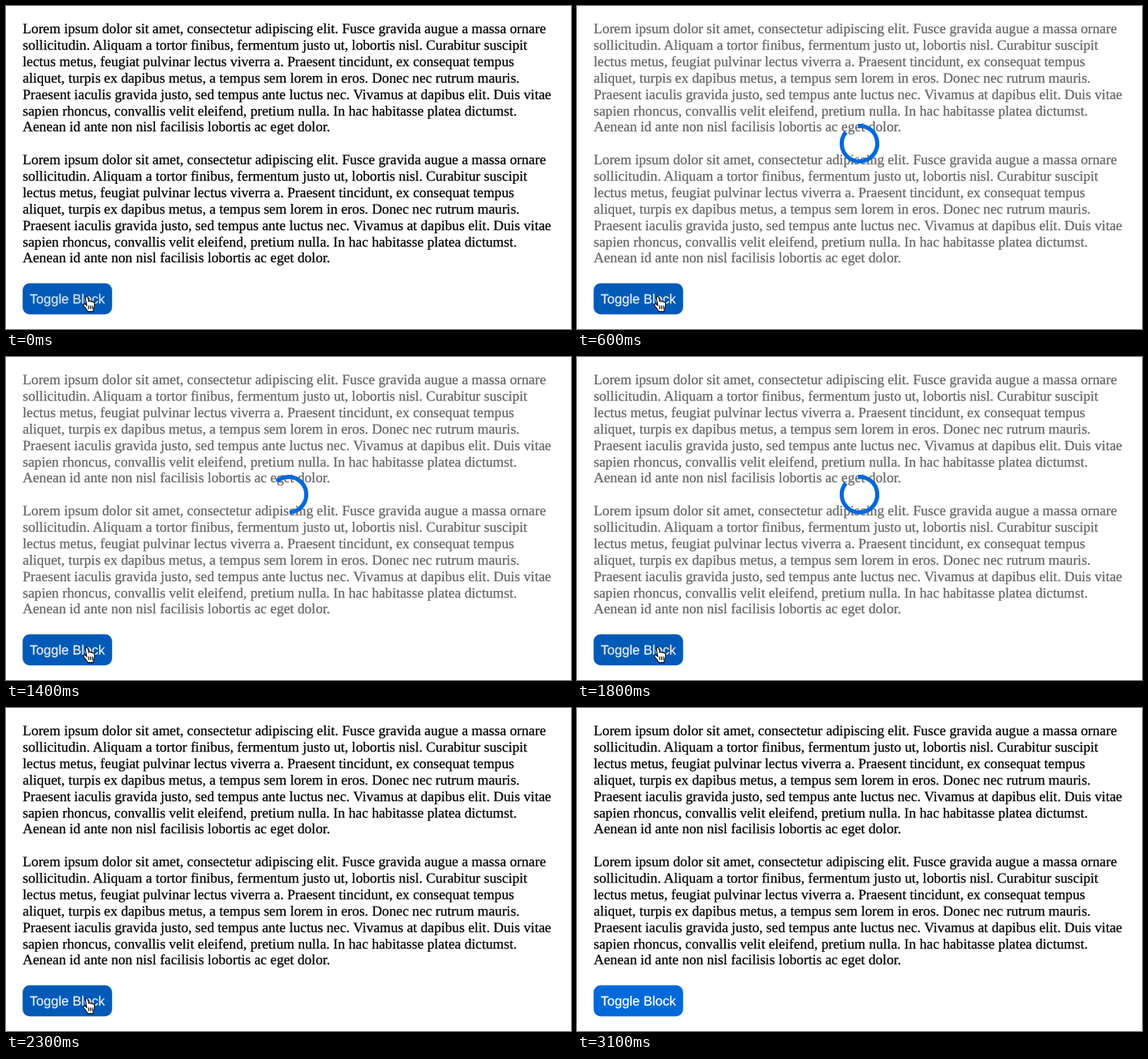
These frames come from a looping animation (686 by 392 pixels, 4.1 s). An HTML page with a canvas:

```html
<!DOCTYPE html>
<html lang="en">
<head>
<meta charset="utf-8">
<title>Toggle Block</title>
<style>
  html, body { margin: 0; width: 100%; height: 100%; overflow: hidden; background: #fff; }
  canvas { display: block; width: 686px; height: 392px; }
</style>
</head>
<body>
<canvas id="stage"></canvas>
<script>
const W = 686, H = 392, LOOP = 4100, STEP = 100;
const canvas = document.getElementById('stage');
const ctx = canvas.getContext('2d');
const ratio = window.devicePixelRatio || 1;
canvas.width = W * ratio;
canvas.height = H * ratio;
ctx.scale(ratio, ratio);
ctx.fontKerning = 'normal';
ctx.textRendering = 'geometricPrecision';
ctx.lineJoin = 'round';

const LINES = [
  'Lorem ipsum dolor sit amet, consectetur adipiscing elit. Fusce gravida augue a massa ornare',
  'sollicitudin. Aliquam a tortor finibus, fermentum justo ut, lobortis nisl. Curabitur suscipit',
  'lectus metus, feugiat pulvinar lectus viverra a. Praesent tincidunt, ex consequat tempus',
  'aliquet, turpis ex dapibus metus, a tempus sem lorem in eros. Donec nec rutrum mauris.',
  'Praesent iaculis gravida justo, sed tempus ante luctus nec. Vivamus at dapibus elit. Duis vitae',
  'sapien rhoncus, convallis velit eleifend, pretium nulla. In hac habitasse platea dictumst.',
  'Aenean id ante non nisl facilisis lobortis ac eget dolor.'
];
const PITCH = 19.87;

// A hairline outline gives the slightly heavy look of smoothed type.
function write(text, x, y, color) {
  ctx.fillStyle = ctx.strokeStyle = color;
  ctx.lineWidth = .25;
  ctx.fillText(text, x, y);
  ctx.strokeText(text, x, y);
}

function drawText(blocked) {
  ctx.font = '17.2px "Liberation Serif", Times, serif';
  const ink = blocked ? '#666' : '#000';
  for (const offset of [0, 8]) {
    LINES.forEach((line, i) => write(line, 20.3, 33.2 + (i + offset) * PITCH, ink));
  }
}

function drawButton(fill, ink) {
  ctx.fillStyle = fill;
  ctx.beginPath();
  ctx.roundRect(20.2, 336.5, 108.6, 37.8, 8.5);
  ctx.fill();
  ctx.font = '16.1px "Liberation Sans", Arial, sans-serif';
  write('Toggle Block', 28.8, 361.2, ink);
}

// Periodic monotone curve through three equally spaced angles, one turn per cycle.
function sweep(keys, phase) {
  const at = i => keys[((i % 3) + 3) % 3] + 360 * Math.floor(i / 3);
  const slope = i => {
    const a = at(i) - at(i - 1), b = at(i + 1) - at(i);
    return 2 * a * b / (a + b);
  };
  const i = Math.floor(phase * 3), u = phase * 3 - i;
  const u2 = u * u, u3 = u2 * u;
  return at(i) * (2 * u3 - 3 * u2 + 1) + slope(i) * (u3 - 2 * u2 + u) +
         at(i + 1) * (3 * u2 - 2 * u3) + slope(i + 1) * (u3 - u2);
}

function drawSpinner(t) {
  const phase = (t + 1000) % 1200 / 1200;
  const rad = Math.PI / 180;
  ctx.strokeStyle = '#0069d9';
  ctx.lineWidth = 5;
  ctx.beginPath();
  ctx.arc(343, 167, 21.6, sweep([-132, -95, 172], phase) * rad, sweep([85, 220, 319], phase) * rad);
  ctx.stroke();
}

function drawHand() {
  ctx.save();
  ctx.translate(93.2, 351.6);
  ctx.scale(1.06, 1.06);
  const hand = new Path2D('M3.2 1.8C3.8.5 5.4.7 5.8 2L7 6.6C7.4 5.6 9 5.6 9.4 6.9' +
    'C10 6 11.4 6.3 11.6 7.4C12.5 6.9 13.6 7.5 13.6 8.8C13.7 11.3 13.2 12.5 12.3 14.4' +
    'L12 18.2H5.6C5.2 15.8 2.8 14.2 1 11.2C.2 9.7 1.8 8.8 3 9.8L4.6 11.4L3.1 3.6Z');
  ctx.fillStyle = '#fff';
  ctx.strokeStyle = '#000';
  ctx.lineWidth = 1;
  ctx.fill(hand);
  ctx.stroke(hand);
  ctx.beginPath();
  for (const x of [6.6, 8.7, 10.8]) {
    ctx.moveTo(x, 11.3);
    ctx.lineTo(x + .1, 15.2);
  }
  ctx.stroke();
  ctx.restore();
}

function render(t) {
  const blocked = t >= 100 && t < 2300;
  ctx.fillStyle = '#fff';
  ctx.fillRect(0, 0, W, H);
  drawText(blocked);
  if (t >= 2700) drawButton('#0069d9', '#fff');
  else if (t >= 2600) drawButton('#0062c8', '#f4f8fc');
  else drawButton('#005ab8', t < 100 ? '#d9e4f2' : '#e6eef7');
  if (blocked) drawSpinner(t);
  if (t < 2600) drawHand();
}

const start = performance.now();
function tick() {
  const t = (performance.now() - start) % LOOP;
  render(Math.floor(t / STEP) * STEP);
  requestAnimationFrame(tick);
}
tick();
</script>
</body>
</html>
```
